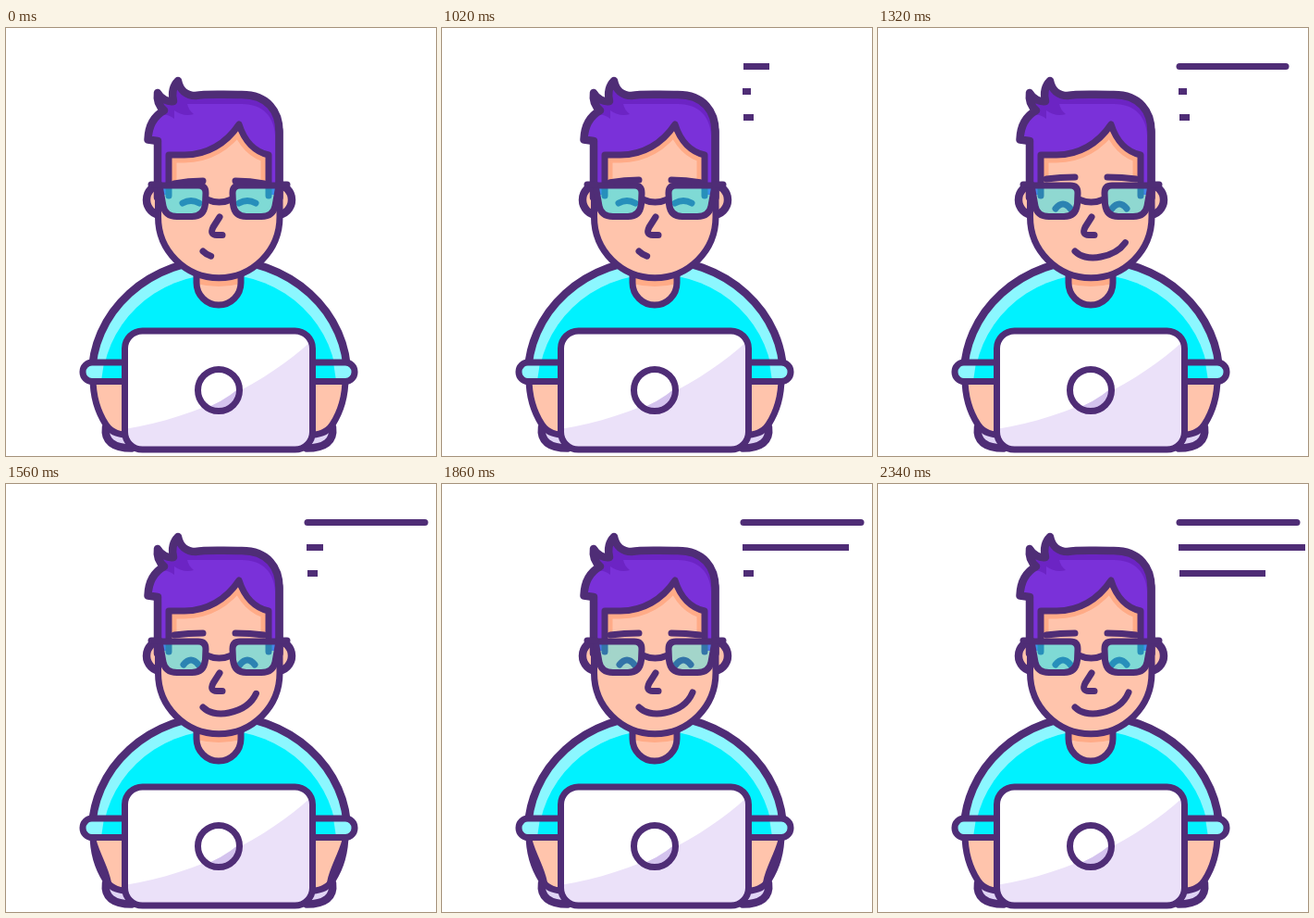
Recreate the animation shown at these times as an HTML page. Size 465 px wide and 462 px high, loop 2.7 s.

```html
<!DOCTYPE html>
<html lang="en">
<head>
<meta charset="utf-8">
<title>Typing at a laptop</title>
<style>
  html, body { margin: 0; width: 100%; height: 100%; overflow: hidden; background: #fff; }
  svg { display: block; width: 100%; height: 100%; }
  .ink { stroke: #4f2d76; stroke-width: 7; stroke-linejoin: round; }
  .rim { stroke-width: 8.5; }
  .open { fill: none; stroke-linecap: round; }
  .skin { fill: #ffc4ac; }
  .shade { fill: #ebe1f9; }
</style>
</head>
<body>
<svg viewBox="0 0 465 462">
  <defs>
    <clipPath id="shirtClip"><path d="M93 375A138 125 0 0 1 369 375Z"/></clipPath>
    <clipPath id="faceClip"><path d="M164 90V204A66 66 0 0 0 296 204V90Z"/></clipPath>
    <clipPath id="badgeClip"><circle cx="230" cy="391" r="22"/></clipPath>
    <clipPath id="laptopClip"><rect x="128" y="327" width="204" height="128" rx="20"/></clipPath>
    <clipPath id="neckClip"><path d="M206 265V275A24 24 0 0 0 254 275V265Z"/></clipPath>
    <g id="arm">
      <path class="ink rim" fill="#e0d4f5" d="M108 431C106 446 116 453.500 136 453.500V436Z"/>
      <path class="ink skin" d="M94 378C94 398 99 414 108 428C114 437 122 439 136 440V378Z"/>
      <path class="armShadow" fill="#4f2d76"/>
    </g>
    <g id="cuff">
      <rect x="83" y="361" width="60" height="20.500" rx="10" fill="#8cf7ff"/>
      <path fill="#00f2ff" d="M106 361H140V381H103Z"/>
      <rect class="ink" x="83" y="361" width="60" height="20.500" rx="10" fill="none"/>
    </g>
    <path id="lens" d="M166 170H208Q216 170 216 178L215.500 190Q214 203.500 201 203.500H185Q172 203.500 170 192Z"/>
  </defs>

  <g id="body">
    <g clip-path="url(#shirtClip)">
      <path fill="#8cf7ff" d="M90 245H372V378H90Z"/>
      <ellipse cx="231" cy="388" rx="127" ry="122" fill="#00f2ff"/>
    </g>
    <path class="ink rim open" d="M93 375A138 125 0 0 1 369 375"/>
    <use href="#arm"/>
    <use href="#arm" transform="matrix(-1 0 0 1 461 0)"/>
    <use href="#cuff"/>
    <use href="#cuff" transform="matrix(-1 0 0 1 460 0)"/>
    <path class="skin" d="M206 265V275A24 24 0 0 0 254 275V265Z"/>
    <path clip-path="url(#neckClip)" fill="#ffab87" d="M206 265H254V276Q230 282 206 276Z"/>
    <path class="ink open" d="M206 268V275A24 24 0 0 0 254 275V268"/>
  </g>

  <g id="laptop">
    <rect x="128" y="327" width="204" height="128" rx="20" fill="#fff"/>
    <path class="shade" clip-path="url(#laptopClip)" d="M128 433C210 420 282 382 330 338V460H128Z"/>
    <rect class="ink" x="128.500" y="327" width="203" height="128" rx="19" fill="none"/>
    <circle cx="230" cy="391" r="22.500" fill="#fff"/>
    <path fill="#d4c3ee" clip-path="url(#badgeClip)" d="M208 413Q236 404 256 385V418H208Z"/>
    <circle class="ink" cx="230" cy="391" r="22.500" fill="none"/>
  </g>

  <g id="head">
    <circle class="ink rim skin" cx="168.500" cy="185.500" r="16.500"/>
    <circle class="ink rim skin" cx="292.500" cy="185.500" r="16.500"/>
    <path class="ink skin" d="M164.500 110V204A65.750 65.750 0 0 0 296 204V110Z"/>
    <path clip-path="url(#faceClip)" fill="none" stroke="#ffab87" stroke-width="17"
      d="M176 166V137H193C217 137 238 125 252 104C258 123 270 134 284 137V166"/>
    <path fill="#6c24c4" d="M164 180V122L153 121C153 106 160 95 171 89C165 84 163 77 164 70C168 77 175 80 181 79C179 70 181 62 186 57C188 67 195 73 205 73C216 71 228 72 255 72C283 72 296 90 296 112V180H284V137C270 134 258 123 252 104C238 125 217 137 193 137H176V180Z"/>
    <path fill="#7a31d9" d="M164 180V122L153 121C157 108 162 98 169 94C174 93 178 95 182 98L182 89C189 94 196 95 203 93C199 90 197 86 196 82H255C278 82 290 96 291 116V180H284V137C270 134 258 123 252 104C238 125 217 137 193 137H176V180Z"/>
    <path class="ink rim open" d="M164 183V122L153.500 120.500C154 106 160 95 171 89C165 84 163 77 164 70C168 77 175 80 181 79C179 70 181 62 186 57C188 67 195 73 205 73C216 71 228 72 255 72C283 72 295.500 90 295.500 112V183"/>
    <path class="ink open" d="M176 181V137H193C217 137 238 125 252 104C258 123 270 134 284 137V181"/>
    <path class="ink open" id="eyes"/>
    <g class="ink" id="glasses">
      <use href="#lens" fill="#00f2ff"/>
      <use href="#lens" fill="#00f2ff" transform="matrix(-1 0 0 1 461 0)"/>
      <path class="open" d="M157 169H166M295 169H304M217 185Q230.500 191 244 185"/>
    </g>
    <path class="ink open" stroke-width="6" id="brows"/>
    <path class="ink open" stroke-width="6" d="M231 204L224 215Q220 223.500 228 223.500H234"/>
    <path class="ink open" id="mouth" pathLength="100"
      d="M213 241C218 246 228 250 241 247C256 244 266 237 271 225"/>
  </g>

  <g id="lines"><path class="ink"/><path class="ink"/><path class="ink"/></g>
</svg>
<script>
const LOOP = 2700, STEP = 60;
const $ = id => document.getElementById(id);
const lines = [...$("lines").children];
const lenses = $("glasses").querySelectorAll("use");
const armShadow = document.querySelector(".armShadow");

// Each track is a list of [time, value], joined linearly.
const tracks = {
  line0: [[120, 338], [180, 354], [1020, 354], [1320, 444], [1380, 456]],
  line1: [[120, 334], [1500, 334], [1560, 343], [1860, 440], [1930, 462]],
  line2: [[120, 337], [2040, 337], [2100, 354], [2340, 419]],
  smile: [[1020, 15], [1320, 89], [1560, 98], [1620, 100]],
  brow: [[960, 0], [1020, 1], [1320, 4]],
  gaze: [[1020, 0], [1320, 1]],
  tint: [[1020, .5], [1320, .44], [1560, .44], [1860, .36], [2100, .36], [2340, .5]],
  arm: [[1320, 0], [1560, 1], [2100, 1], [2340, 0]]
};

function valueAt(track, t) {
  const next = track.findIndex(([time]) => time > t);
  if (next === 0) return track[0][1];
  if (next < 0) return track[track.length - 1][1];
  const [t0, v0] = track[next - 1], [t1, v1] = track[next];
  return v0 + (v1 - v0) * (t - t0) / (t1 - t0);
}

function draw(t) {
  const at = name => valueAt(tracks[name], t);

  $("lines").style.display = t < 120 ? "none" : "";
  const growing = t > 1020;
  lines.forEach((line, i) => {
    const round = i === 0 && growing;
    const start = [326, 325, 326][i];
    const end = at("line" + i) - (round ? 3 : 0);
    line.setAttribute("d", `M${start} ${[41.5, 68.5, 96.5][i]}H${end}`);
    line.setAttribute("stroke-linecap", round ? "round" : "butt");
  });

  $("mouth").setAttribute("stroke-dasharray", `${at("smile")} 200`);

  const lift = at("brow"), tilt = 3 - lift / 4;
  const y = 165 - lift;
  $("brows").setAttribute("d",
    `M182 ${y + tilt}Q197 ${y} 213 ${y}M248 ${y}Q264 ${y} 279 ${y + tilt}`);

  const gaze = at("gaze");
  const side = 189 + 6 * gaze, peak = 184 + gaze, half = 9 - gaze;
  const eye = x => `M${x - half} ${side}Q${x} ${peak} ${x + half} ${side}`;
  $("eyes").setAttribute("d", eye(200) + eye(261));

  lenses.forEach(lens => lens.setAttribute("fill-opacity", at("tint")));

  const inset = 8 * at("arm");
  armShadow.setAttribute("d",
    `M94 382C94 398 99 414 108 430L${110 + inset / 2} 430C${103 + inset} 414 ${97 + inset / 2} 398 97 382Z`);
}

function tick(now) {
  draw(Math.floor(now % LOOP / STEP) * STEP);
  requestAnimationFrame(tick);
}
draw(0);
requestAnimationFrame(tick);
</script>
</body>
</html>
```
